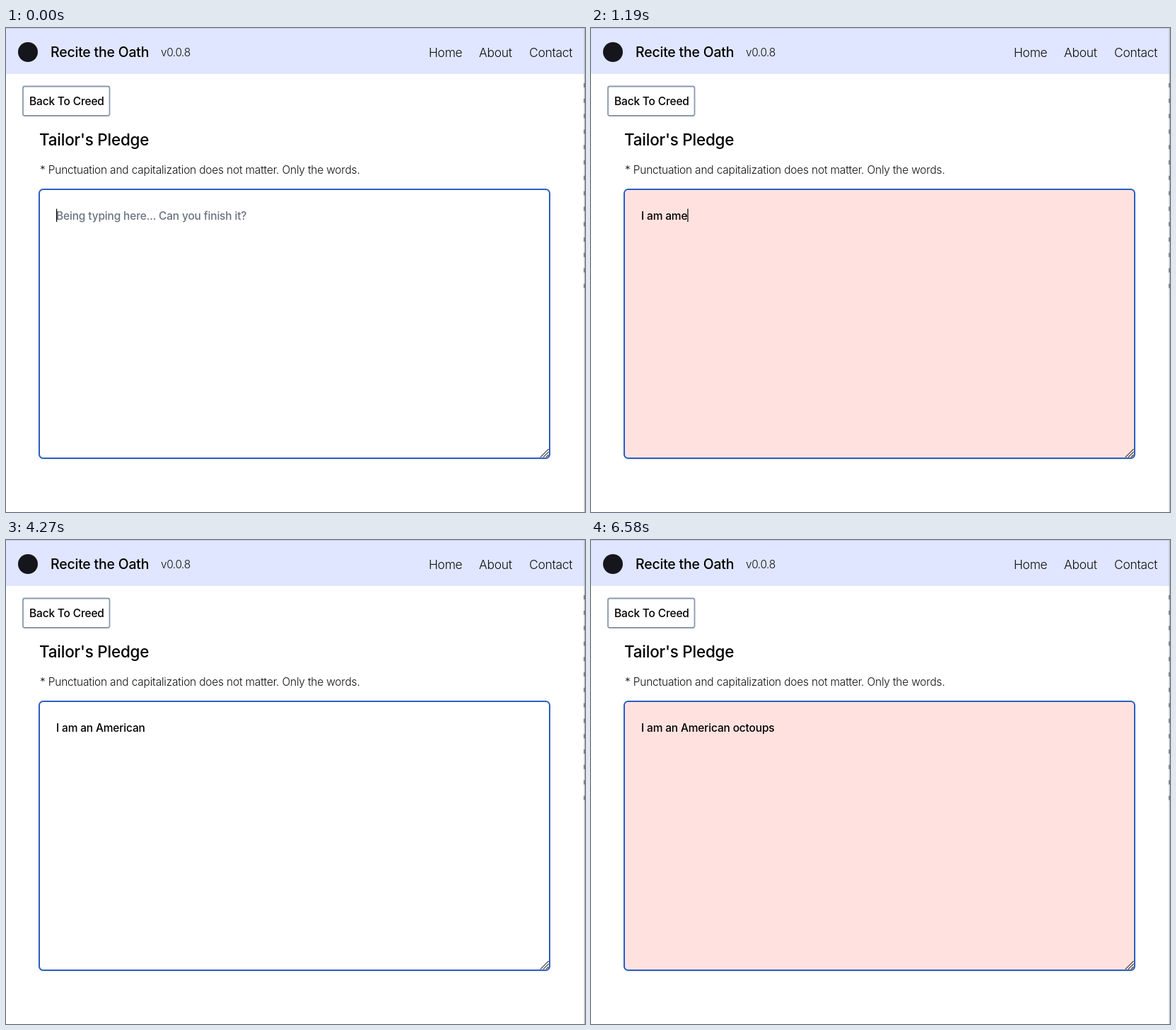
An HTML page for the animation above (6650 ms loop, 819x684 px).

```html
<!DOCTYPE html>
<html lang="en">
<head>
<meta charset="utf-8">
<title>Typing practice</title>
<style>
  html, body { margin: 0; width: 100%; height: 100%; overflow: hidden; background: #fff; }
  svg { display: block; width: 819px; height: 684px; }
  text { font: 500 15.5px Inter, "Open Sans", sans-serif; letter-spacing: -.011em; white-space: pre; fill: #000; }
  .light { font-weight: 300; letter-spacing: -.013em; fill: #111; }
  .nav { font-size: 17.5px; letter-spacing: -.019em; }
  .version { letter-spacing: -.03em; }
  .title { font-size: 19.5px; }
  .heading { font-size: 22.5px; }
</style>
</head>
<body>
<svg viewBox="0 0 819 684">
  <rect width="819" height="65" fill="#e0e6ff"/>
  <path d="M0 .5H819" stroke="#c9cbd6"/>
  <circle cx="31" cy="34" r="14" fill="#15161c"/>
  <text class="title" x="63" y="41">Recite the Oath</text>
  <text class="light version" x="219" y="40">v0.0.8</text>
  <text class="light nav" x="598" y="40.5">Home</text>
  <text class="light nav" x="669" y="40.5">About</text>
  <text class="light nav" x="740" y="40.5">Contact</text>

  <rect x="24" y="82.5" width="122.5" height="41.5" rx="2.5" fill="#fff" stroke="#8b9aad" stroke-width="1.8"/>
  <text x="33" y="109">Back To Creed</text>
  <text class="heading" x="47" y="166">Tailor's Pledge</text>
  <text class="light" x="48" y="206">* Punctuation and capitalization does not matter. Only the words.</text>

  <rect x="47" y="229.5" width="722" height="380" rx="6" fill="none" stroke="#000" stroke-opacity=".06" stroke-width="2"/>
  <rect id="box" x="47" y="228" width="722" height="380" rx="5.5" stroke="#2a5fc0" stroke-width="2"/>
  <path d="M756 606.5L767.5 595M760 606.5L767.5 599M764 606.5L767.5 603" stroke="#444" stroke-width="1.1"/>
  <text id="line" x="71" y="270.7"></text>
  <rect id="caret" y="255.5" width="1.2" height="18.5"/>

  <path d="M818.3 0V684" stroke="#b4b4b8" stroke-width="1.2"/>
  <path d="M818 78V370" stroke="#666" stroke-width="1.4" stroke-dasharray="6 15.8"/>
</svg>
<script>
const LOOP = 6650;
const GOAL = "i am an american soldier";
const HINT = "Being typing here... Can you finish it?";
const [box, line, caret] = ["box", "line", "caret"].map(id => document.getElementById(id));

// Each step: [start in ms, typed text, caret visible]
const steps = [[0, "", true]];
const show = (at, text, on = true) => steps.push([at, text, on]);
const type = (at, gap, base, letters) =>
  [...letters].forEach((_, i) => show(at + i * gap, base + letters.slice(0, i + 1)));

type(70, 140, "", "I am am");
type(980, 70, "I am am", "er");
show(1190, "I am ame");
show(1260, "I am am");
show(1330, "I am a");
type(1540, 140, "I am a", "n a");
show(2100, "I am an a", false);
show(2380, "I am an a");
show(2660, "I am an ");
show(2940, "I am an ", false);
show(3220, "I am an ");
type(3290, 105, "I am an ", "American ");
show(4270, "I am an American ", false);
show(4550, "I am an American o");
type(4760, 154, "I am an American o", "ctoups");
show(5810, "I am an American octoups", false);
show(6090, "I am an American octoups");
show(6370, "I am an American octoups", false);

function draw(now) {
  const t = now % LOOP;
  const [, text, on] = steps.findLast(s => s[0] <= t);
  line.textContent = text || HINT;
  line.style.fill = text ? "#000" : "#6b7280";
  box.style.fill = GOAL.startsWith(text.toLowerCase()) ? "#fff" : "#ffe2e0";
  caret.setAttribute("x", 71 + (text ? line.getComputedTextLength() : 0));
  caret.style.visibility = on ? "visible" : "hidden";
  requestAnimationFrame(draw);
}
requestAnimationFrame(draw);
</script>
</body>
</html>
```
